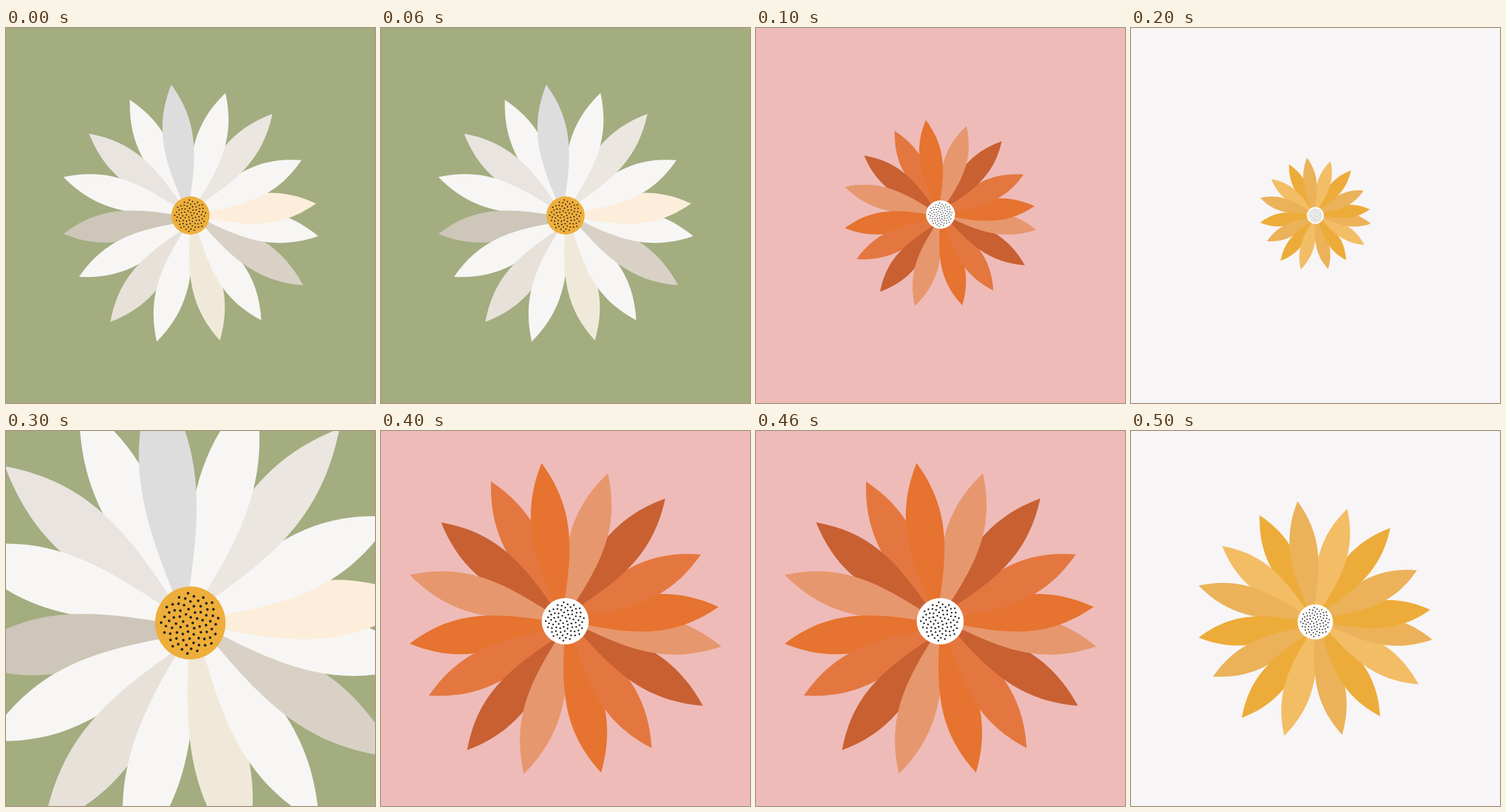
Write an HTML page that moves like this. It is 540 px wide and 550 px high and loops after 600 ms.

```html
<!DOCTYPE html>
<html lang="en">
<head>
<meta charset="utf-8">
<title>Blinking flower</title>
<style>
  html, body { margin: 0; width: 100%; height: 100%; overflow: hidden; background: #a3ad80; }
  svg { display: block; width: 540px; height: 550px; }
</style>
</head>
<body>
<svg id="stage" viewBox="0 0 540 550"></svg>
<script>
const NS = 'http://www.w3.org/2000/svg';
const STEP = 100;
const stage = document.getElementById('stage');

function add(parent, tag, attrs) {
  const el = document.createElementNS(NS, tag);
  for (const key in attrs) el.setAttribute(key, attrs[key]);
  return parent.appendChild(el);
}

// Clockwise from the top: tip x, tip y, base x, base y
const petals = [
  [235, 47, 264, 276], [332, 62, 266, 279], [416, 99, 264, 274], [468, 181, 269, 276],
  [494, 258, 270, 278], [498, 316, 270, 275], [471, 403, 273, 274], [396, 465, 274, 276],
  [322, 501, 270, 279], [209, 503, 274, 280], [126, 468, 271, 294], [70, 388, 275, 288],
  [42, 312, 265, 282], [42, 211, 265, 278], [88, 134, 266, 279], [161, 74, 266, 279]
];

// A symmetric leaf, pinched a little at the base
function leaf([tx, ty, bx, by]) {
  const dx = tx - bx, dy = ty - by, len = Math.hypot(dx, dy);
  const at = (along, side) =>
    (bx + dx * along - dy / len * side).toFixed(2) + ' ' +
    (by + dy * along + dx / len * side).toFixed(2);
  return `M${at(0, 0)}C${at(.41, 29)} ${at(.67, 42)} ${at(1, 0)}` +
         `C${at(.67, -42)} ${at(.41, -29)} ${at(0, 0)}Z`;
}

const daisy = {
  back: '#a3ad80', heart: '#eeae3a',
  fill: ('#dddddd #f7f6f4 #ebe6e0 #f7f6f4 #fceedb #f7f6f4 #d9d1c6 #f7f6f4 ' +
         '#f0e9d9 #f7f6f4 #e7e1da #f7f6f4 #cdc6b9 #f7f6f4 #e9e4e0 #f7f6f4').split(' ')
};
const rust = {
  back: '#eebbb8', heart: '#ffffff',
  fill: ['#e6732f', '#e7976d', '#c86032', '#e47740']
};
const [tan, light, deep] = ['#ebb25a', '#f3bd65', '#edac39'];
const gold = {
  back: '#f7f5f6', heart: '#ffffff',
  fill: [tan, light, deep, tan, deep, tan, light, deep,
         tan, light, deep, tan, deep, tan, light, deep]
};

// move: scale x, scale y, shift x, shift y; heart: centre and radii
const poses = [
  { look: daisy, move: [.818, .8268, 49.6, 44.1], heart: [270, 275, 28, 28] },
  { look: rust, move: [.614, .5987, 104.2, 106.7], heart: [270, 273.6, 21.2, 20.8] },
  { look: gold, move: [.3553, .3596, 174.1, 173.3], heart: [269.8, 275, 12.4, 12.4] },
  { look: daisy, move: [1.493, 1.585, -132.9, -160.7], heart: [269.7, 281.5, 51.6, 53.6] },
  { look: rust, move: [1, 1, 0, 0], heart: [269.6, 279, 34.4, 34.1] },
  { look: gold, move: [.75, .7544, 67.5, 67.6], heart: [269.7, 280, 25.9, 25.8] }
];

function drawDots(parent) {
  const count = 75, turn = Math.PI * (3 - Math.sqrt(5));
  for (let i = 0; i < count; i++) {
    const r = .84 * Math.sqrt((i + .5) / count), a = i * turn;
    add(parent, 'circle', { cx: r * Math.cos(a), cy: r * Math.sin(a), r: .037, fill: '#222222' });
  }
}

function drawPose({ look, move, heart }) {
  const pose = add(stage, 'g', { opacity: 0 });
  add(pose, 'rect', { width: 540, height: 550, fill: look.back });

  const [sx, sy, x, y] = move;
  const bloom = add(pose, 'g', { transform: `matrix(${sx} 0 0 ${sy} ${x} ${y})` });
  for (let i = petals.length - 1; i >= 0; i--) {
    add(bloom, 'path', { d: leaf(petals[i]), fill: look.fill[i % look.fill.length] });
  }

  const [cx, cy, rx, ry] = heart;
  const middle = add(pose, 'g', { transform: `matrix(${rx} 0 0 ${ry} ${cx} ${cy})` });
  add(middle, 'circle', { r: 1, fill: look.heart });
  drawDots(middle);
  return pose;
}

const layers = poses.map(drawPose);

function tick(now) {
  const current = Math.floor(now / STEP) % layers.length;
  layers.forEach((layer, i) => layer.setAttribute('opacity', i === current ? 1 : 0));
}

const start = performance.now();
function loop() {
  tick(performance.now() - start);
  requestAnimationFrame(loop);
}
loop();
</script>
</body>
</html>
```
